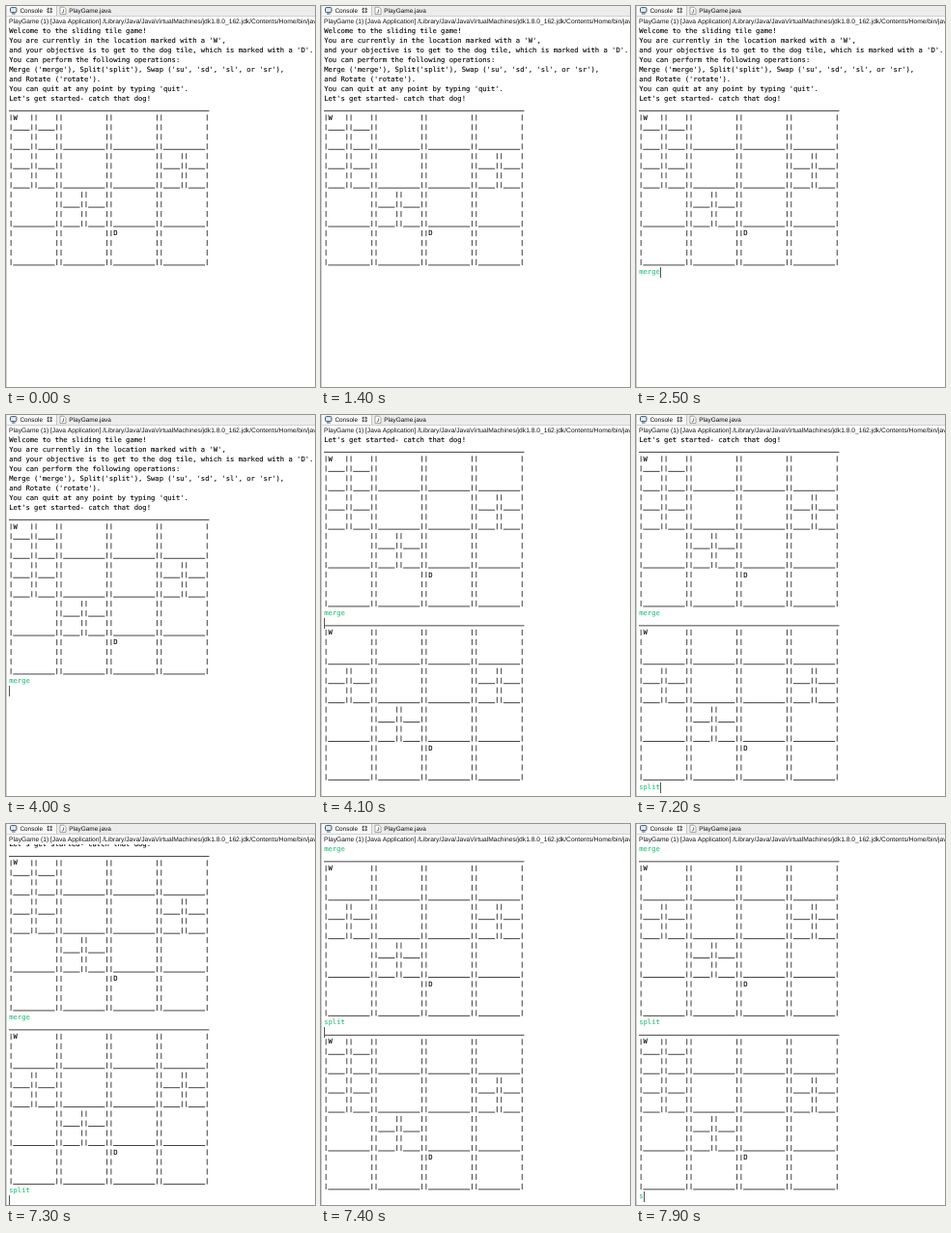
Recreate the animation shown at these times as an HTML page. Size 320x394 px, loop 8 s.

```html
<!DOCTYPE html>
<html lang="en">
<head>
<meta charset="utf-8">
<title>Sliding tile game</title>
<style>
  html, body { margin: 0; width: 100%; height: 100%; overflow: hidden; background: #fff; }
  #stage { position: relative; width: 320px; height: 394px; overflow: hidden; text-rendering: geometricPrecision; }
  #chrome { position: absolute; inset: 0; font-family: "Liberation Sans", Arial, sans-serif; font-kerning: none; }
  #view { position: absolute; left: 2px; right: 0; top: 21px; bottom: 0; overflow: hidden; }
  #page { position: absolute; left: 1.2px; top: 0; }
  #log { margin: 0; color: #000; -webkit-text-stroke: .1px;
    font: 7.18px/9.97px "DejaVu Sans Mono", monospace; font-variant-ligatures: none; }
  #log i { font-style: normal; color: #2fbf80; }
  #log s { text-decoration: none; color: transparent; }
  #grid { position: absolute; left: 0; top: 0; overflow: visible; }
  #caret { position: absolute; width: 1px; height: 11px; background: #555; }
</style>
</head>
<body>
<div id="stage">
  <svg id="chrome" width="320" height="394" viewBox="0 0 320 394">
    <rect width="320" height="10" fill="#ececec"/>
    <rect x="1" width="51" height="10" fill="#f8f8f8"/>
    <path d="M0 10.5H320" stroke="#d2d2d2"/>
    <path d="M52.5 0V10" stroke="#c4c4c4"/>
    <path d="M.5 0V394" stroke="#cfcfcf"/>
    <rect x="4.5" y="1.6" width="6.4" height="5" rx="1" fill="#dce9f7" stroke="#46566e"/>
    <path d="M6 8H9.6" stroke="#46566e"/>
    <path id="cross" d="M43 2.4l4.4 4.4m0-4.4l-4.4 4.4" stroke="#555" stroke-width="2.2"/>
    <use href="#cross" style="filter: brightness(3)" transform="translate(22.6 2.3) scale(.5)"/>
    <path d="M56 1.2h4l2 2v5.4h-6z" fill="#fff" stroke="#8d8063" stroke-width=".7"/>
    <path d="M59.6 3.4v2.6q0 1.2-1.8.9" fill="none" stroke="#5574a8"/>
    <g fill="#111" font-size="6.45">
      <text x="14.4" y="6.8">Console</text>
      <text x="65.2" y="6.8">PlayGame.java</text>
      <text x="3" y="18.3" font-size="6.68">PlayGame (1) [Java Application] /Library/Java/JavaVirtualMachines/jdk1.8.0_162.jdk/Contents/Home/bin/java</text>
    </g>
  </svg>
  <div id="view">
    <div id="page">
      <pre id="log"></pre>
      <svg id="grid" width="210" height="10"><path fill="none" stroke="#222" stroke-width=".85"/></svg>
    </div>
    <div id="caret"></div>
  </div>
</div>
<script>
const LOOP = 8000, LINE = 9.97, CHAR = 4.322;
const page = document.getElementById('page');
const log = document.getElementById('log');
const grid = document.querySelector('#grid path');
const caret = document.getElementById('caret');

const intro = `Welcome to the sliding tile game!
You are currently in the location marked with a 'W',
and your objective is to get to the dog tile, which is marked with a 'D'.
You can perform the following operations:
Merge ('merge'), Split('split'), Swap ('su', 'sd', 'sl', or 'sr'),
and Rotate ('rotate').
You can quit at any point by typing 'quit'.
Let's get started- catch that dog!
`;

// One text line of a tile; split tiles are two by two.
function tileLine(split, mark, y) {
  const floor = y === 3 || (split && y === 1);
  const size = split ? 4 : 10;
  const fill = (floor ? '_' : ' ').repeat(size);
  const first = y === 0 ? (mark + fill).slice(0, size) : fill;
  return split ? `|${first}||${fill}|` : `|${first}|`;
}

function board(splits) {
  let out = '_'.repeat(48) + '\n';
  for (let line = 0; line < 16; line++) {
    for (let col = 0; col < 4; col++) {
      const tile = (line >> 2) * 4 + col;
      const mark = tile === 0 ? 'W' : tile === 14 ? 'D' : '';
      out += tileLine(splits.includes(tile), mark, line % 4);
    }
    out += '\n';
  }
  return out;
}

// Short bars and high underscores, ruled over the same characters of the text.
function rule(text) {
  let path = '';
  text.split('\n').forEach((line, row) => {
    const y = row * LINE;
    for (const { 0: run, index } of line.matchAll(/\||_+/g)) {
      path += run === '|'
        ? `M${(index + .5) * CHAR} ${y + 1.6}v6.2`
        : `M${index * CHAR} ${y + 7.65}h${run.length * CHAR}`;
    }
  });
  return path;
}

const whole = board([4, 7, 9]), halved = board([0, 4, 7, 9]);
const first = intro + halved;
const second = first + 'merge\n' + whole;
const third = second + 'split\n' + halved;

const markup = text => text
  .replace(/[|_]+/g, '<s>$&</s>')
  .replace(/^(merge|split)$/gm, '<i>$&</i>');

// [start ms, text, typed, top line, caret line (-1 hides it), caret column]
const steps = [
  [0, first, '', 0, -1, 0],
  [700, first, '', 0, 25, 0],
  [1300, first, '', 0, -1, 0],
  [1900, first, '', 0, 25, 0],
  [2000, first, 'm', 0, 25, 1],
  [2200, first, 'me', 0, 25, 2],
  [2300, first, 'mer', 0, 25, 3],
  [2400, first, 'merg', 0, 25, 4],
  [2500, first, 'merge', 0, 25, 5],
  [3000, first, 'merge', 0, -1, 0],
  [3500, first, 'merge', 0, 25, 5],
  [4000, first, 'merge', 0, 26, 0],
  [4100, second, '', 7, 26, 0],
  [4600, second, '', 7, -1, 0],
  [5200, second, '', 7, 26, 0],
  [5800, second, '', 7, -1, 0],
  [6300, second, '', 7, 26, 0],
  [6800, second, 's', 7, 43, 1],
  [6900, second, 'sp', 7, 43, 2],
  [7100, second, 'spli', 7, 43, 4],
  [7200, second, 'split', 7, 43, 5],
  [7300, second, 'split', 7.55, 44, 0],
  [7400, third, '', 25, 44, 0],
  [7900, third, 's', 25, 61, 1]
];

let shown;
function draw() {
  const t = performance.now() % LOOP;
  const step = steps.findLast(s => s[0] <= t);
  if (step !== shown) {
    shown = step;
    const [, text, typed, top, row, col] = step;
    log.innerHTML = `${markup(text)}<i>${typed}</i>\n`;
    grid.setAttribute('d', rule(text));
    page.style.top = -top * LINE + 'px';
    caret.hidden = row < 0;
    caret.style.left = Math.round(1.2 + col * CHAR) + 'px';
    caret.style.top = Math.round((row - top) * LINE) + 'px';
  }
  requestAnimationFrame(draw);
}
draw();
</script>
</body>
</html>
```
